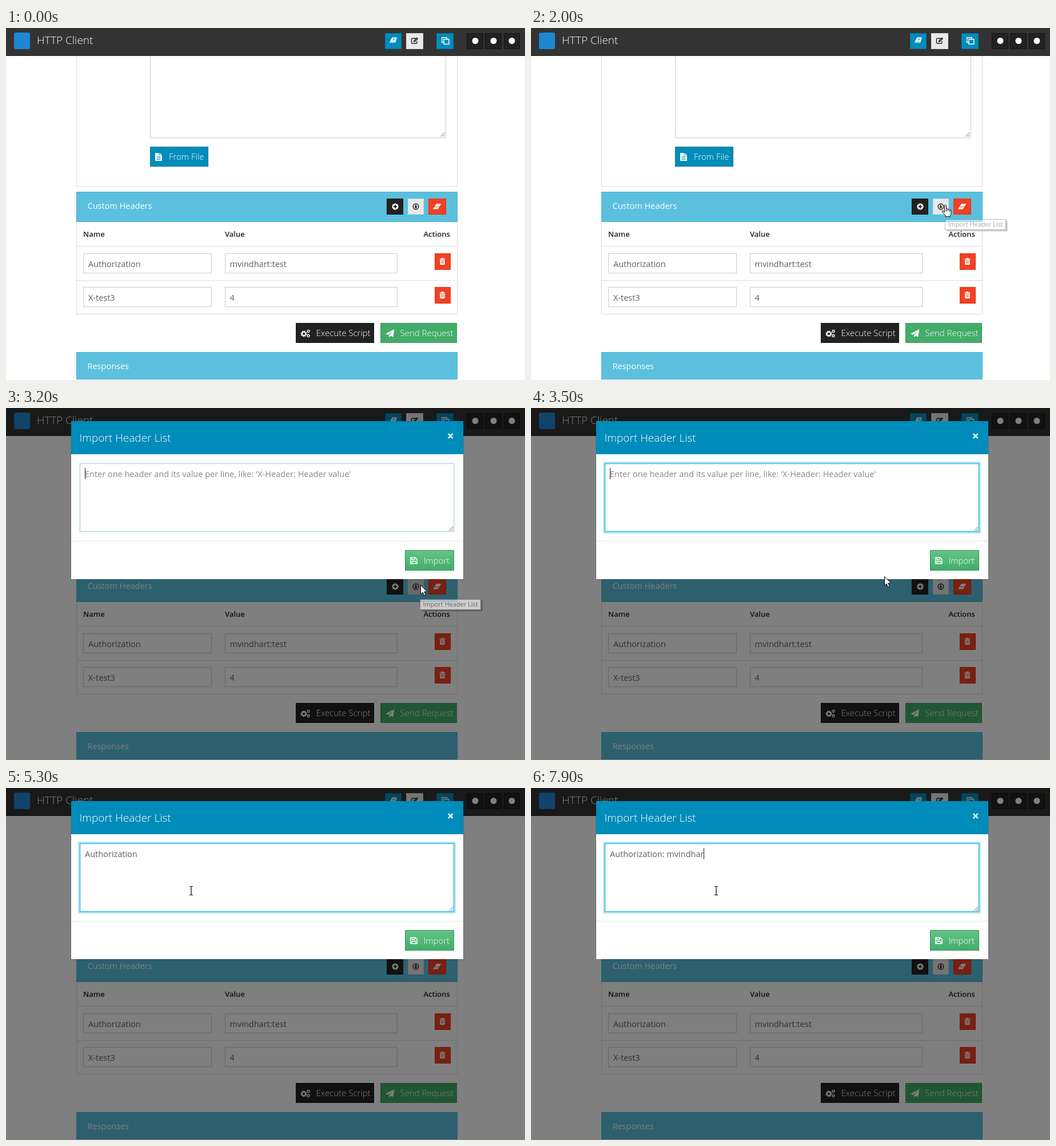
Animation of 908 by 617 pixels, one loop 8000 ms. Source, as an HTML page:

```html
<!DOCTYPE html>
<html lang="en">
<head>
<meta charset="utf-8">
<title>HTTP Client</title>
<style>
html, body { margin: 0; width: 100%; height: 100%; overflow: hidden; background: #fff; }
svg { display: block; width: 908px; height: 617px; }
text { font: 400 14.5px "Open Sans", sans-serif; fill: #fff; white-space: pre; }
.light { font-size: 15px; font-weight: 300; }
.title { font-size: 19px; font-weight: 300; }
.th { font-size: 13px; font-weight: 600; fill: #222; }
.val { fill: #5f5f5f; }
.hint { fill: #888; }
.tip text { font-size: 11px; fill: #575757; }

.line { fill: none; stroke: #ddd; }
.field { fill: #fff; stroke: #ccc; }
.info { fill: #5bc0de; stroke: #46b2d2; }
.blue { fill: #008cba; stroke: #0079a1; }
.grey { fill: #e9e9e9; stroke: #dadada; }
.dark { fill: #222; stroke: #151515; }
.red { fill: #f04124; stroke: #ea2f10; }
.green { fill: #43ac6a; stroke: #3c9a5f; }
.w { fill: #fff; }
.o { fill: none; stroke: #fff; stroke-width: 1.4; }
.k { fill: none; stroke: #222; stroke-width: 1.4; }

.cursor, .tip, .modal, .glow, .press, .arrow, .hand, .beam {
  animation: 8s step-end infinite;
}
.modal { animation-name: modal; }
.glow { animation-name: glow; }
.tip { animation-name: tip; }
.press { animation-name: press; }
.cursor { animation-name: move; }
.arrow { animation-name: arrow; }
.hand { animation-name: hand; }
.beam { animation-name: beam; }

@keyframes modal { 0% { opacity: 0 } 40%, 100% { opacity: 1 } }
@keyframes glow { 0% { opacity: 0 } 40% { opacity: .15 } 41.25% { opacity: .7 } 42.5%, 100% { opacity: 1 } }
@keyframes press { 0% { opacity: 0 } 38.75% { opacity: 1 } 41.25%, 100% { opacity: 0 } }
@keyframes tip {
  0% { opacity: 0 } 23.75% { opacity: .25 } 25% { opacity: .5 } 26.25% { opacity: .75 }
  27.5% { opacity: 1 } 40% { opacity: .6 } 41.25%, 100% { opacity: 0 }
}
@keyframes move {
  0% { transform: translate(920px, 530px) }
  3.75% { transform: translate(848px, 525px) }
  5% { transform: translate(752px, 521px) }
  6.25% { transform: translate(670px, 514px) }
  8.75% { transform: translate(612px, 494px) }
  10% { transform: translate(545px, 468px) }
  11.25% { transform: translate(484px, 442px) }
  12.5% { transform: translate(452px, 420px) }
  13.75% { transform: translate(488px, 394px) }
  15% { transform: translate(585px, 354px) }
  16.25% { transform: translate(669px, 320px) }
  17.5% { transform: translate(708px, 313px) }
  18.75% { transform: translate(725px, 310px) }
  41.25% { transform: translate(706px, 308px) }
  42.5% { transform: translate(668px, 303px) }
  43.75% { transform: translate(618px, 295px) }
  45% { transform: translate(540px, 272px) }
  46.25% { transform: translate(440px, 232px) }
  47.5% { transform: translate(362px, 196px) }
  48.75%, 100% { transform: translate(324px, 180px) }
}
@keyframes arrow { 0% { opacity: 1 } 5% { opacity: 0 } 6.25% { opacity: 1 } 16.25% { opacity: 0 } 40% { opacity: 1 } 47.5%, 100% { opacity: 0 } }
@keyframes hand { 0% { opacity: 0 } 5% { opacity: 1 } 6.25% { opacity: 0 } 16.25% { opacity: 1 } 40%, 100% { opacity: 0 } }
@keyframes beam { 0% { opacity: 0 } 47.5%, 100% { opacity: 1 } }
</style>
</head>
<body>
<svg viewBox="0 0 908 617">
  <defs>
    <linearGradient id="leaf" x2="0" y2="1">
      <stop stop-color="#63c487"/><stop offset="1" stop-color="#43ac6a"/>
    </linearGradient>
    <g id="trash">
      <rect class="red" x=".5" y=".5" width="27" height="28"/>
      <path class="w" d="M8.5 9.5h10v1.3h-10zM11.5 8h4v1.5h-4zM9.3 11.5h8.4v7.2q0 1.3-1.3 1.3h-5.8q-1.3 0-1.3-1.3z"/>
      <path d="M11.7 12.8v5.2M13.5 12.8v5.2M15.3 12.8v5.2" stroke="#f04124" stroke-width=".8"/>
    </g>
    <path id="grip" d="M0 7.5L7.5 0M4 7.5L7.5 4" fill="none" stroke="#666"/>
    <g id="gear" fill="none" stroke="#fff">
      <circle r="3.3" stroke-width="2.2"/>
      <circle r="4.8" stroke-width="1.6" stroke-dasharray="1.9 1.87"/>
    </g>
  </defs>

  <!-- body panel -->
  <path class="line" d="M123.5 49V277.5H789.5V49"/>
  <path class="field" d="M252.5 40V192.5H769.5V40"/>
  <use href="#grip" x="760" y="183"/>
  <rect class="blue" x="252.5" y="208.5" width="101" height="34"/>
  <path class="w" d="M261 219h6.5v4.5h5.500v9.500h-12zM268.500 219l4.500 3.700h-4.500z"/>
  <path d="M263.500 225.500h7M263.500 228h7M263.500 230.500h7" stroke="#008cba"/>
  <text class="light" x="285" y="231">From File</text>

  <!-- headers panel -->
  <rect class="line" x="123.500" y="287.500" width="666" height="214"/>
  <rect class="info" x="123.500" y="287.500" width="666" height="52"/>
  <text x="142.500" y="317">Custom Headers</text>
  <rect class="dark" x="666.500" y="299.500" width="28" height="27"/>
  <circle class="w" cx="681" cy="313" r="5.600"/>
  <path d="M677.800 313h6.400M681 309.800v6.400" stroke="#222" stroke-width="1.800"/>
  <rect class="grey" x="703.500" y="299.500" width="27" height="27"/>
  <rect class="press" x="703" y="299" width="28" height="28" fill="#d2d2d2"/>
  <circle class="k" cx="717" cy="313" r="4.800"/>
  <path d="M716 310h2v3h2l-3 3.200l-3-3.200h2z" fill="#222"/>
  <rect class="red" x="739.500" y="299.500" width="30" height="27"/>
  <path class="w" d="M753 308h8.500l-6 9.500h-8.500z"/>
  <path d="M750 313.500h7.500" stroke="#f04124" stroke-width=".9"/>

  <text class="th" x="135" y="366">Name</text>
  <text class="th" x="383" y="366">Value</text>
  <text class="th" x="730.500" y="366">Actions</text>
  <path class="line" d="M124 382.500H789M124 442.500H789"/>
  <rect class="field" x="135.500" y="395.500" width="224" height="34"/>
  <rect class="field" x="383.500" y="395.500" width="301" height="34"/>
  <rect class="field" x="135.500" y="454.500" width="224" height="34"/>
  <rect class="field" x="383.500" y="454.500" width="301" height="34"/>
  <text class="val" x="144" y="419">Authorization</text>
  <text class="val" x="391.500" y="419">mvindhart:test</text>
  <text class="val" x="144" y="478">X-test3</text>
  <text class="val" x="391.500" y="478">4</text>
  <use href="#trash" x="750" y="395"/>
  <use href="#trash" x="750" y="454"/>

  <!-- actions -->
  <rect class="dark" x="507.500" y="517.500" width="136" height="34"/>
  <use href="#gear" x="521" y="536"/>
  <use href="#gear" transform="translate(529 531.500) scale(.55)"/>
  <use href="#gear" transform="translate(529 539.500) scale(.55)"/>
  <text class="light" x="542.500" y="540">Execute Script</text>
  <rect class="green" x="655.500" y="517.500" width="133" height="34"/>
  <path class="w" d="M679.500 528l-2.300 13.500l-4.500-1.900l-2.700 3.200v-4.300l7.200-8l-8.700 7.300l-4.500-1.800z"/>
  <text class="light" x="689.500" y="540">Send Request</text>
  <rect class="info" x="123.500" y="568.500" width="666" height="47"/>
  <text x="142.500" y="598">Responses</text>

  <!-- top bar -->
  <rect width="908" height="49" fill="#333"/>
  <rect y="48" width="908" height="1" fill="#222"/>
  <rect x="14" y="8" width="28" height="29" rx="3" fill="#2086d2"/>
  <text class="title" x="54" y="28">HTTP Client</text>
  <rect class="blue" x="663.500" y="9.500" width="28" height="27"/>
  <path class="w" d="M675.500 16.500h8.500l-3 9.500h-8.500q-1.500 0-1-1.500z"/>
  <path d="M676.500 19h5M675.800 21h5M672.500 24.500h8" stroke="#008cba" stroke-width=".9"/>
  <rect class="grey" x="700.500" y="9.500" width="29" height="27"/>
  <path class="k" d="M717 18.200h-6q-1.500 0-1.500 1.500v5.800q0 1.500 1.500 1.500h6.500q1.500 0 1.500-1.500v-2.500" stroke-width="1.200"/>
  <path d="M713 24.500v-2.500l5.700-5.700l2.500 2.500l-5.700 5.700z" fill="#222"/>
  <path d="M714.500 22.800l4.300-4.300" stroke="#e9e9e9" stroke-width=".8"/>
  <rect class="blue" x="753.500" y="9.500" width="29" height="27"/>
  <path class="o" d="M765.700 25.200h-3v-8.500h8.500v2.500M766 19.700h8.800v8.600h-8.800z"/>
  <rect class="dark" x="806.500" y="9.500" width="28" height="27"/>
  <rect class="dark" x="838.500" y="9.500" width="28" height="27"/>
  <rect class="dark" x="871.500" y="9.500" width="27" height="27"/>
  <circle class="w" cx="821" cy="22.500" r="5.500"/>
  <circle class="w" cx="853" cy="22.500" r="5.500"/>
  <circle class="w" cx="885" cy="22.500" r="5.500"/>

  <!-- dialog -->
  <g class="modal">
    <rect width="908" height="617" opacity=".5"/>
    <rect x="113.500" y="23" width="687" height="277.500" opacity=".25"/>
    <rect class="w" x="114" y="23" width="686" height="277"/>
    <rect x="114" y="23" width="686" height="58" fill="#008cba"/>
    <text class="title" x="128.500" y="59">Import Header List</text>
    <path d="M773.700 45l8 8M781.700 45l-8 8" stroke="#d9edf4" stroke-width="2.500"/>
    <rect class="field" x="129.500" y="97.500" width="654" height="119"/>
    <g class="glow" fill="none">
      <rect x="127.500" y="95.500" width="658" height="123" rx="1" stroke="#b9e5f4" stroke-width="3"/>
      <rect x="129.500" y="97.500" width="654" height="119" stroke="#35bde6" stroke-width="1.500"/>
    </g>
    <use href="#grip" x="775" y="208"/>
    <text class="hint" id="hint" x="138" y="121">Enter one header and its value per line, like: 'X-Header: Header value'</text>
    <text class="val" id="typed" x="138" y="121" xml:space="preserve"></text>
    <rect id="caret" x="138" y="105" width="1" height="20" fill="#222"/>
    <path d="M114 233.500H800" stroke="#e5e5e5"/>
    <rect x="698.500" y="249.500" width="85" height="35" fill="url(#leaf)" stroke="#34915a"/>
    <path class="o" d="M707.700 262.200h8.300l3.200 3.200v7.300h-11.500zM710 262.500v3.300h5v-3.300M710 272.500v-3.800h6.800v3.800" stroke-width="1.300"/>
    <text class="light" x="730.500" y="273">Import</text>
  </g>

  <g class="tip">
    <rect x="728" y="338" width="106" height="19" opacity=".2"/>
    <rect x="727" y="337" width="106" height="18.500" opacity=".35"/>
    <rect x="724.500" y="335.500" width="106" height="18" fill="#fff" stroke="#767676"/>
    <text x="729.500" y="348">Import Header List</text>
  </g>

  <g class="cursor">
    <path class="arrow" d="M.5.5v16l3.700-3.500l2.500 5.700l2.500-1.100l-2.500-5.500h5.100z" fill="#fff" stroke="#000"/>
    <g class="hand" fill="#fff" stroke="#000" stroke-linejoin="round">
      <path d="M-1.500 13V1.800q0-1.600 1.500-1.600t1.500 1.600V7q2.600-1 3 .8q2.500-.8 3 .9q2.500-.4 2.500 1.800v4q0 2.500-1.800 4v2.200h-8v-2q-2.700-2.500-5.500-6.700q-.6-2.200 1.500-1.800z"/>
      <path d="M1.500 7v4.500M4.500 8v3.500M7.500 9v3" fill="none"/>
    </g>
    <path class="beam" d="M-3-7.500h2.500l.5.500l.5-.5h2.500M-3 7.500h2.500l.5-.5l.5.500h2.500M0-7v14" fill="none" stroke="#000" stroke-width="1.200"/>
  </g>
</svg>
<script>
const LOOP = 8000, FOCUS = 3100, BLINK = 500, LEFT = 138;
const keys = [
  [4800, 'Authorization'], [6300, ':'], [6600, ' '], [6800, 'm'], [7000, 'v'],
  [7200, 'i'], [7300, 'n'], [7500, 'd'], [7700, 'h'], [7800, 'a'], [7900, 'r']
];
const [hint, typed, caret] = ['hint', 'typed', 'caret'].map(id => document.getElementById(id));
let start;

function draw(now) {
  start ??= now;
  const t = (now - start) % LOOP;
  const done = keys.filter(([at]) => at <= t);
  const text = done.map(([, key]) => key).join('');
  const last = done.length ? done[done.length - 1][0] : FOCUS;
  if (typed.textContent !== text) typed.textContent = text;
  hint.style.display = text ? 'none' : '';
  const width = text ? typed.getComputedTextLength() : 0;
  caret.setAttribute('x', Math.round(LEFT + width));
  caret.style.display = Math.floor((t - last) / BLINK) % 2 ? 'none' : '';
  requestAnimationFrame(draw);
}
requestAnimationFrame(draw);
</script>
</body>
</html>
```
